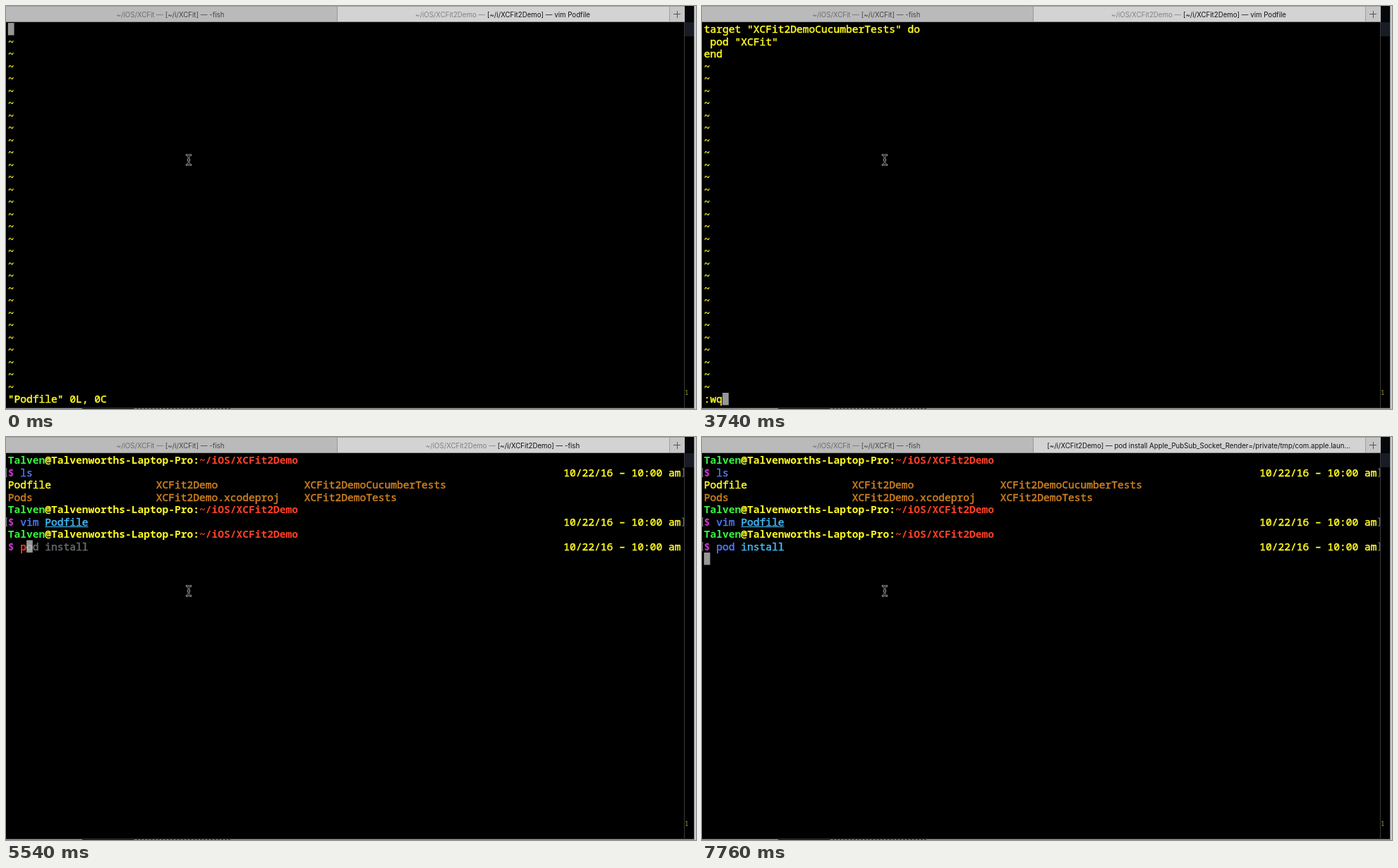
An HTML page with a canvas for the animation above (8000 ms loop, 978 px wide and 572 px high).

```html
<!DOCTYPE html>
<html lang="en">
<head>
<meta charset="utf-8">
<title>Terminal session</title>
<style>
html, body { margin: 0; width: 100%; height: 100%; overflow: hidden; background: #000; }
canvas { display: block; }
</style>
</head>
<body>
<canvas id="stage" width="978" height="572"></canvas>
<script>
const ctx = document.getElementById('stage').getContext('2d');
const LOOP = 8000, CELL = 8.75, LINE = 17.5, LEFT = 2.8, TOP = 24;
const YELLOW = '#fffb22', CYAN = '#28d5d8', BLUE = '#4a7aff', SKY = '#45bbf6',
  ORANGE = '#cd8020', GREEN = '#35f53c', RED = '#ff4027', PINK = '#cc35cf', GREY = '#686d70';

const colX = col => LEFT + col * CELL;
const rowY = row => TOP + row * LINE;

function box(x, y, w, h, color) {
  ctx.fillStyle = color;
  ctx.fillRect(x, y, w, h);
}

// Writes on the character grid and returns the next free column.
// Plain text gets a fine outline for a medium weight.
function put(col, row, text, color = YELLOW, bold = false) {
  ctx.font = `${bold ? 700 : 400} 14.58px "Noto Sans Mono", monospace`;
  ctx.fillStyle = ctx.strokeStyle = color;
  ctx.lineWidth = 0.5;
  [...text].forEach((ch, i) => {
    const x = colX(col + i), y = rowY(row) + 14;
    ctx.fillText(ch, x, y);
    if (!bold) ctx.strokeText(ch, x, y);
  });
  return col + text.length;
}

function caret(col, row) {
  box(colX(col), rowY(row), CELL, LINE, '#979797');
}

function tabTitle(center, path, rest, pathColor, restColor) {
  ctx.font = '9.7px Inter, sans-serif';
  const pathWidth = ctx.measureText(path).width;
  const x = center - (pathWidth + ctx.measureText(rest).width) / 2;
  ctx.fillStyle = pathColor;
  ctx.fillText(path, x, 16);
  ctx.fillStyle = restColor;
  ctx.fillText(rest, x + pathWidth, 16);
}

function drawWindow(t) {
  box(0, 0, 978, 572, '#000');
  box(0, 0, 962, 23, '#bababa');
  box(470, 0, 492, 23, '#d3d3d3');
  box(0, 0, 962, 1, '#a0a0a0');
  box(469, 1, 1, 22, '#989898');
  box(940, 1, 1, 22, '#a2a2a2');
  box(941, 1, 21, 22, '#c6c6c6');
  box(0, 22, 962, 1, '#858585');
  box(946, 11, 10, 1, '#555');
  box(951, 7, 1, 10, '#555');
  box(961, 23, 1, 548, '#3a3a3a');
  box(962, 0, 13, 23, '#05070b');
  box(962, 23, 13, 20, '#171c25');
  box(975, 0, 3, 572, '#c9cbcc');
  box(975, 0, 1, 572, '#8f9294');
  box(0, 570, 975, 1, '#333636');
  box(0, 571, 975, 1, '#9c9f9f');
  box(108, 571, 72, 1, '#171717');
  for (let x = 180; x < 318; x += 5) box(x, 571, 3, 1, '#444');
  ctx.font = '9px "Noto Sans Mono", monospace';
  ctx.fillStyle = '#a5a32c';
  ctx.fillText('1', 962, 552);

  tabTitle(233, '~/iOS/XCFit — ', '[~/i/XCFit] — -fish', '#6d6d6d', '#444');
  if (t < 7760) {
    const job = t < 4790 ? 'vim Podfile' : '-fish';
    tabTitle(704, '~/iOS/XCFit2Demo — ', '[~/i/XCFit2Demo] — ' + job, '#808080', '#111');
  } else {
    tabTitle(704, '', '[~/i/XCFit2Demo] — pod install Apple_PubSub_Socket_Render=/private/tmp/com.apple.laun...', '#111', '#111');
  }
}

function drawEditor(t) {
  const filled = t >= 900;
  if (t < 900) caret(0, 0);
  else if (t < 3000) caret(3, 2);
  else if (t < 3450) caret(2, 2);
  else if (t < 4490) caret(t < 3740 ? 1 : 3, 30);

  if (filled) {
    put(0, 0, 'target "XCFit2DemoCucumberTests" do');
    put(1, 1, 'pod "XCFit"');
    put(0, 2, 'end');
  }
  for (let row = filled ? 3 : 1; row < 30; row++) put(0, row, '~', YELLOW, true);

  if (t < 300) put(0, 30, '"Podfile" 0L, 0C');
  else if (t < 3000) put(0, 30, '-- INSERT --', CYAN, true);
  else if (t >= 4490) put(0, 30, '"Podfile" 3L, 53C written');
  else if (t >= 3450) put(0, 30, t < 3740 ? ':' : ':wq');
}

function prompt(row, done) {
  let col = put(0, row, 'Talven', GREEN, true);
  col = put(col, row, '@');
  col = put(col, row, 'Talvenworths-Laptop-Pro:', YELLOW, true);
  put(col, row, '~/iOS/XCFit2Demo', RED, true);
  put(0, row + 1, '$', PINK, true);
  put(90, row + 1, '10/22/16 – 10:00 am');
  if (!done) return;
  const y = rowY(row + 1) + 3;
  for (const x of [0, 960]) {
    box(x, y, 1, 12, '#777');
    box(x ? 958 : 0, y, 2, 1, '#777');
    box(x ? 958 : 0, y + 11, 2, 1, '#777');
  }
}

function drawShell(t) {
  prompt(0, true);
  put(2, 1, 'ls', BLUE);
  put(0, 2, 'Podfile');
  put(24, 2, 'XCFit2Demo', ORANGE);
  put(48, 2, 'XCFit2DemoCucumberTests', ORANGE);
  put(0, 3, 'Pods', ORANGE);
  put(24, 3, 'XCFit2Demo.xcodeproj', ORANGE);
  put(48, 3, 'XCFit2DemoTests', ORANGE);
  prompt(4, true);
  put(2, 5, 'vim', BLUE);
  put(6, 5, 'Podfile', SKY);
  box(colX(6), rowY(5) + 15.5, 7 * CELL, 1, SKY);

  const entered = t >= 7610;
  prompt(6, entered);
  // Each entry: start time, number of typed characters.
  const keys = [[0, 0], [5540, 1], [5840, 3], [5980, 4], [6130, 5], [6270, 6], [6420, 7], [7320, 11]];
  const typed = keys.filter(([start]) => t >= start).pop()[1];
  if (entered) caret(0, 8);
  else caret(2 + typed, 7);
  if (!typed) return;
  const command = 'pod install';
  put(2, 7, command.slice(0, Math.min(typed, 3)), typed < 3 ? RED : BLUE);
  put(6, 7, command.slice(4, Math.max(typed, 4)), SKY);
  put(2 + typed, 7, command[typed] || '', '#b4b4b4');
  put(3 + typed, 7, command.slice(typed + 1), GREY);
}

function drawPointer() {
  const beam = new Path2D('M256 211.5Q258.5 211.5 259 213.5Q259.5 211.5 262 211.5M259 213.5V223.5M256 225.5Q258.5 225.5 259 223.5Q259.5 225.5 262 225.5M258 218.5H260');
  ctx.lineCap = 'round';
  for (const [width, color] of [[2.6, '#ccc'], [1.2, '#000']]) {
    ctx.lineWidth = width;
    ctx.strokeStyle = color;
    ctx.stroke(beam);
  }
}

function frame() {
  const t = performance.now() % LOOP;
  drawWindow(t);
  if (t < 4640) drawEditor(t);
  else drawShell(t);
  drawPointer();
  requestAnimationFrame(frame);
}
frame();
</script>
</body>
</html>
```
